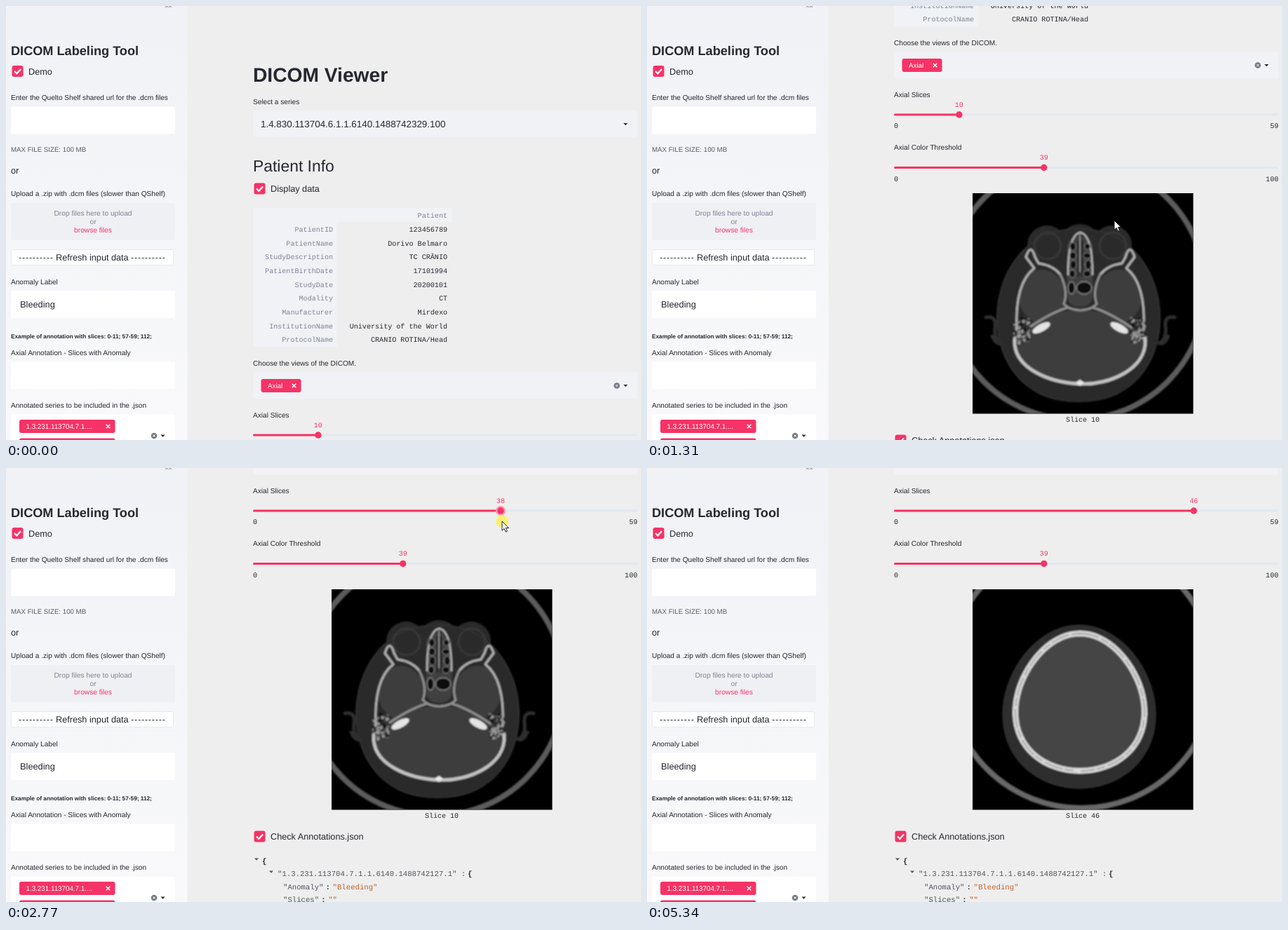
An HTML page for the animation above (5.41 s loop, 905x619 px).

```html
<!DOCTYPE html>
<html lang="en">
<head>
<meta charset="utf-8">
<title>DICOM Labeling Tool</title>
<style>
html, body { margin: 0; width: 100%; height: 100%; overflow: hidden; background: #eee; }
svg { display: block; width: 905px; height: 619px; font-family: "Liberation Sans", Arial, sans-serif; text-rendering: geometricPrecision; white-space: pre; }
.m { font-family: "Liberation Mono", "DejaVu Sans Mono", monospace; }
.r { text-anchor: end; }
.c { text-anchor: middle; }
.b { font-weight: bold; }
</style>
</head>
<body>
<svg id="stage" viewBox="0 0 905 619"></svg>
<script>
const PINK = '#f63366', INK = '#262730', GRAY = '#808495', PALE = '#f0f2f6', ORANGE = '#c4622d';
const LOOP = 5410, STEP = 76.92;

// y is the vertical middle of the capitals
const text = (s, x, y, size = 10.1, fill = INK, cls = '', id = '') =>
  `<text id="${id}" x="${x}" y="${y + size * .35}" font-size="${size}" fill="${fill}" class="${cls}">${s}</text>`;
const mono = (s, x, y, fill = INK, cls = '', size = 10.1, id = '') => text(s, x, y, size, fill, 'm ' + cls, id);
const rect = (x, y, w, h, fill = '#fff', more = '') =>
  `<rect x="${x}" y="${y}" width="${w}" height="${h}" fill="${fill}" ${more}/>`;
const path = (d, fill = 'none', stroke = 'none', width = 1, more = '') =>
  `<path d="${d}" fill="${fill}" stroke="${stroke}" stroke-width="${width}" ${more}/>`;
const line = (d, color, width) => path(d, 'none', color, width, 'stroke-linecap="round" stroke-linejoin="round"');
const ellipse = (x, y, rx, ry, fill, more = '') =>
  `<ellipse cx="${x}" cy="${y}" rx="${rx}" ry="${ry}" fill="${fill}" ${more}/>`;
const circle = (x, y, r, fill, more) => ellipse(x, y, r, r, fill, more);
const ring = (x, y, r, color, width) => circle(x, y, r, 'none', `stroke="${color}" stroke-width="${width}"`);

// widgets
const cross = (x, y, r, color = '#fff', w = 1.5) =>
  path(`M${x - r} ${y - r}l${2 * r} ${2 * r}M${x + r} ${y - r}l${-2 * r} ${2 * r}`, 'none', color, w);
const caret = (x, y, color = INK) => path(`M${x - 3} ${y - 1.5}h6l-3 3.2z`, color);
const clear = (x, y) => circle(x, y, 4.3, '#777b88') + cross(x, y, 1.5, '#fff', 1) + caret(x + 12.5, y);
const check = (x, y, label) => rect(x, y, 16, 16, PINK, 'rx="3"') +
  path(`M${x + 3.5} ${y + 8}l3.3 3.3 5.8-6.3`, 'none', '#fff', 2.2) + text(label, x + 23.5, y + 8.5, 12.7);
const chip = (x, y, w, label) => rect(x, y, w, 19, PINK, 'rx="3"') +
  text(label, x + 9.5, y + 10, 9.8, '#fff') + cross(x + w - 10, y + 9.5, 2.8);
const select = (label, y) => text(label, 352, y) + rect(352, y + 13, 548, 38, PALE, 'rx="3"');
const field = (label, y) => text(label, 7, y) + rect(7, y + 13, 234, 39, '#fff', 'rx="3"');
const slider = (label, y, max, id) =>
  text(label, 352, y - 29) + mono('', 0, y - 15, PINK, 'c', 10, id + 'Value') +
  rect(352, y - 1.5, 548, 3, '#e4e8f1', 'rx="1.5"') + rect(352, y - 1.5, 0, 3, PINK, `rx="1.5" id="${id}Bar"`) +
  `<g id="${id}Knob">${circle(0, y, 7, '#f89bb3', `id="${id}Halo" visibility="hidden"`)}${circle(0, y, 4.7, PINK)}</g>` +
  mono(0, 352, y + 15.5) + mono(max, 900, y + 15.5, INK, 'r');

// scan slices
let seed = 7;
const random = (a, b) => a + (b - a) * (seed = seed * 16807 % 2147483647) / 2147483647;

// egg outline: taper > 0 narrows the top, power < 1 squares the sides
function egg(cx, cy, rx, ry, taper = 0, power = 1) {
  const points = Array.from({ length: 72 }, (_, i) => {
    const a = i * Math.PI / 36, s = Math.sin(a), c = Math.cos(a);
    const x = Math.sign(s) * Math.abs(s) ** power * (1 - taper * c);
    return `${(cx + rx * x).toFixed(1)} ${(cy - ry * c).toFixed(1)}`;
  });
  return `M${points.join('L')}Z`;
}
const mirrored = half => half() + `<g transform="translate(307) scale(-1 1)">${half()}</g>`;

function lowSide() {
  const bone = '#b4b4b4';
  let s = line('M19 177q15-3 13 14t9 23q-7 3-13-10', '#2e2e2e', 5) + ring(107, 75, 19, '#393939', 2.5) +
    ellipse(99, 147, 33, 38, '#3d3d3d') +
    line('M63 195Q60 128 88 107L76 91q7-21 13 0l5 9q21 3 31 16', bone, 3) +
    line('M125 116q12 24 5 42 7 8 23 9M136 163Q112 170 80 192', '#929292', 3) +
    ellipse(98, 192, 14, 5.5, '#e4e4e4', 'transform="rotate(-28 98 192)"');
  for (let i = 0; i < 60; i++)
    s += circle(random(59, 82), random(178, 214), random(.8, 2.4), i % 3 ? '#989898' : '#111');
  s += line('M136 116Q136 60 153 56', '#b5b5b5', 2.5);
  for (let y = 76; y < 122; y += 13)
    s += ellipse(143 + random(-1, 1), y, random(4, 5.5), random(4, 7), '#080808', 'stroke="#888"');
  return s + line('M151 68V118', '#080808', 2);
}

const lowSlice = () => ring(147, 138, 185, '#5b5b5b', 8) +
  [106, 199].map(x => circle(x, 74, 28, '#2b2b2b')).join('') + ellipse(153, 66, 26, 22, '#2b2b2b') +
  path(egg(151, 174, 116, 123, .03, .88), '#2b2b2b', '#323232', 2) +
  ellipse(153, 219, 90, 52, '#3d3d3d') + rect(135, 62, 36, 100, '#414141', 'rx="15"') +
  mirrored(lowSide) +
  ellipse(141, 135, 5, 9, '#080808', 'stroke="#aaa"') + ellipse(159, 135, 11, 9, '#080808', 'stroke="#aaa"') +
  line('M153 58V112', '#bbb', 1.2) +
  line('M60 208C57 250 110 270 153 272S249 250 246 208', '#c4c4c4', 4.5) +
  path('M147 270l6-4 6 4-6 5z', '#e8e8e8');

function highSlice() {
  const skull = egg(153, 161, 91, 98, .15);
  return ring(155, 122, 190, '#686868', 8) + path(egg(152, 167.5, 108, 116, .1), '#2d2d2d', '#343434', 2) +
    path(skull, '#454545', '#dcdcdc', 8) + path(skull, 'none', '#999', 1.8, 'stroke-dasharray="28 3 13 2"') +
    path('M144 255h14l-7 8z', '#ddd');
}

// patient table and annotations
const rows = Object.entries({
  PatientID: '123456789', PatientName: 'Dorivo Belmaro', StudyDescription: 'TC CRÂNIO',
  PatientBirthDate: '17101994', StudyDate: '20200101', Modality: 'CT', Manufacturer: 'Mirdexo',
  InstitutionName: 'University of the World', ProtocolName: 'CRANIO ROTINA/Head'
});
const table = rect(352, 288, 284, 20, PALE) + rect(352, 288, 120, 198.5, PALE) + mono('Patient', 629, 298.5, GRAY, 'r') +
  rows.map(([key, value], i) => {
    const y = 318.3 + 19.68 * i;
    return mono(key, 466, y, GRAY, 'r') + mono(value, 629, y, INK, 'r');
  }).join('');

const json = (s, x, row, fill = '#50545c', cls = '') => mono(s, x, 1111 + 18.5 * row, fill, cls, 10.65);
const pair = (key, value, row) => {
  const x = 395 + key.length * 6.4;
  return json(key, 395, row) + json(':', x + 3, row, INK, 'b') + json(value, x + 13, row, ORANGE);
};
const annotations = caret(357, 1109, '#555') + json('{', 365, 0, INK, 'b') +
  caret(378, 1127, '#555') + json('"1.3.231.113704.7.1.1.6140.1488742127.1" :', 387, 1) + json('{', 658, 1, INK, 'b') +
  pair('"Anomaly"', '"Bleeding"', 2) + pair('"Slices"', '""', 3);

const page =
  text('DICOM Viewer', 352, 98, 28.2, INK, 'b') + select('Select a series', 136) +
  text('1.4.830.113704.6.1.1.6140.1488742329.100', 363, 168, 13.4) + caret(883, 168.5) +
  text('Patient Info', 352, 228, 22.9) + check(353.5, 252.5, 'Display data') + table +
  select('Choose the views of the DICOM.', 509.3) + chip(363.5, 532, 57, 'Axial') + clear(870.5, 541.5) +
  slider('Axial Slices', 612, 59, 'slice') + slider('Axial Color Threshold', 687.5, 100, 'level') +
  `<svg x="464" y="724" width="314.5" height="314.5">${rect(0, 0, 315, 315, '#000')}
    <g filter="url(#soft)"><g id="low">${lowSlice()}</g><g id="high">${highSlice()}</g></g></svg>` +
  mono('', 621, 1046, INK, 'c', 10, 'caption') + check(353.5, 1068.5, 'Check Annotations.json') + annotations;

const dashes = x => `<g letter-spacing=".74">${text('----------', x, 358.5, 12.7)}</g>`;
const sidebar = rect(0, 0, 258.5, 619, 'url(#side)') +
  path('M227 2l2-2 2 2M232 2l2-2 2 2', 'none', '#aaa', 1.2) +
  text('DICOM Labeling Tool', 7, 63.5, 18.15, INK, 'b') + check(8.5, 85, 'Demo') +
  field('Enter the Quelto Shelf shared url for the .dcm files', 130.5) +
  text('MAX FILE SIZE: 100 MB', 7, 204.5, 9.7, '#555a66') + text('or', 7, 234.5, 12.7) +
  text('Upload a .zip with .dcm files (slower than QShelf)', 7, 267.5) + rect(7, 281, 234, 53, '#eef0f4', 'rx="3"') +
  ['Drop files here to upload', 'or', 'browse files'].map((s, i) =>
    text(s, 124, 295.5 + 12 * i, 10.2, i < 2 ? GRAY : PINK, 'c')).join('') +
  rect(7.5, 347.5, 231, 22, '#fff', 'rx="2" stroke="#e6e9ef"') +
  dashes(18) + text('Refresh input data', 71, 358.5, 12.7) + dashes(178) +
  field('Anomaly Label', 393) + text('Bleeding', 20, 425.5, 12.8) +
  text('Example of annotation with slices: 0-11; 57-59; 112;', 7, 471.5, 8.25, INK, 'b') +
  field('Axial Annotation - Slices with Anomaly', 494.5) +
  field('Annotated series to be included in the .json', 569.5) +
  chip(19, 590, 136.5, '1.3.231.113704.7.1....') + rect(19, 616.5, 136.5, 10, PINK, 'rx="3"') + clear(211, 613);

const running = `<g id="running">${rect(805, -20, 95, 27, '#f5f6f9', 'rx="2"')}` +
  ring(816, 1, 4, '#9a9da8', 1.6) + ring(827, 1, 4, '#9a9da8', 1.6) + line('M816 1l5-4 6 4', '#9a9da8', 1.6) +
  text('RUNNING...', 838, -1.2, 9.8, '#a3a6b0') + '</g>';

const $ = id => document.getElementById(id);
$('stage').innerHTML = `<defs><linearGradient id="side" x2="0" y2="1"><stop stop-color="${PALE}"/><stop offset="1" stop-color="#f9f9fb"/></linearGradient>
  <filter id="soft"><feGaussianBlur stdDeviation=".8"/></filter></defs>` +
  rect(0, 0, 905, 619, '#eee') + `<g id="page">${page}</g>` + running + sidebar +
  `<g id="pointer">${circle(0, 0, 9, '#fdf06a', 'id="press" opacity=".9"')}${path('M0 0V13.3L3.1 10.4 5.3 15.2 7.4 14.2 5.3 9.5H9.4Z', '#fff', '#111', .9)}</g>`;

// keys: [tick, ...values], linear between ticks
function track(keys, n) {
  const i = keys.findIndex(k => k[0] > n);
  if (i < 0) return keys[keys.length - 1].slice(1);
  if (!i) return keys[0].slice(1);
  const a = keys[i - 1], b = keys[i], u = (n - a[0]) / (b[0] - a[0]);
  return a.slice(1).map((v, k) => v + (b[k + 1] - v) * u);
}
const scrollKeys = [[7, 0], [10, 197], [17, 457], [20, 531], [23, 551]];
const pointerKeys = [[1, 930, 722], [4, 707, 355], [15, 707, 355], [17, 666, 306], [20, 611, 233], [23, 519, 106],
  [30, 446, 61], [36, 707, 76], [40, 787, 67], [49, 787, 67], [53, 848, 22], [60, 770, 127], [64, 690, 640]];

const show = (id, on) => $(id).setAttribute('visibility', on ? 'visible' : 'hidden');
const move = (id, x, y) => $(id).setAttribute('transform', `translate(${x} ${y})`);
function setSlider(id, value, max) {
  const w = 548 * value / max;
  $(id + 'Bar').setAttribute('width', w);
  $(id + 'Value').setAttribute('x', 352 + w);
  $(id + 'Value').textContent = value;
  move(id + 'Knob', 352 + w, 0);
}
setSlider('level', 39, 100);

function draw() {
  const t = performance.now() % LOOP, n = Math.floor((t + 9) / STEP);
  const [x, y] = track(pointerKeys, n);
  move('page', 0, -track(scrollKeys, n)[0]);
  move('pointer', x, y);
  const dragged = Math.min(46, Math.round((x - 355) / 548 * 59));
  setSlider('slice', n <= 30 ? 10 : n >= 40 ? 46 : dragged, 59);
  show('sliceHalo', n >= 29 && t < 5340);
  show('press', n >= 30 && n < 43);
  show('running', n >= 44 && n < 50);
  $('caption').textContent = 'Slice ' + (n < 45 ? 10 : 46);
  show('low', n < 50);
  show('high', n >= 50);
  requestAnimationFrame(draw);
}
draw();
</script>
</body>
</html>
```
